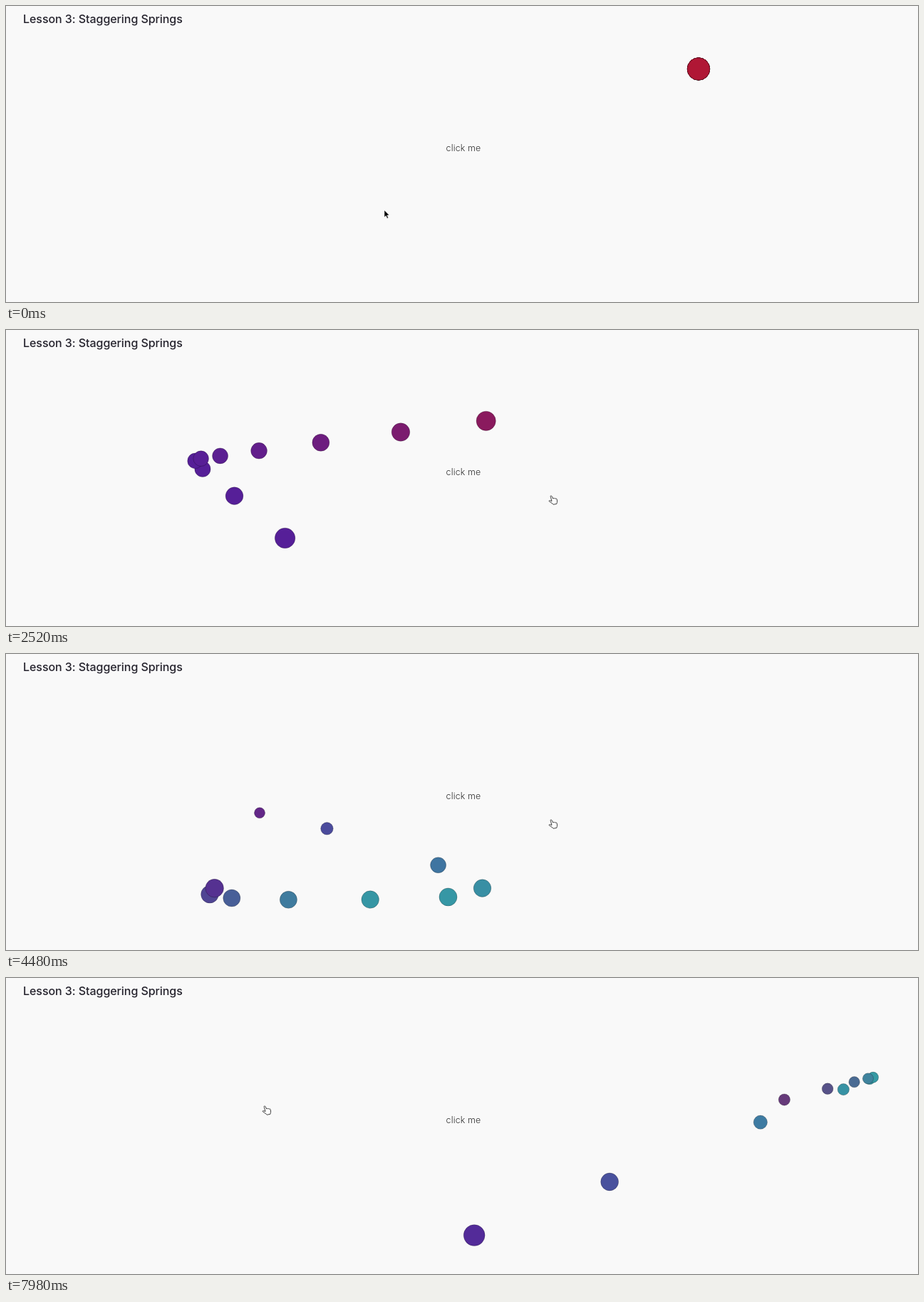
Recreate the animation shown at these times as an HTML page. Size 1280 px wide and 416 px high, loop 8000 ms.

```html
<!DOCTYPE html>
<html lang="en">
<head>
<meta charset="utf-8">
<title>Staggering Springs</title>
<style>
  html, body { margin: 0; width: 100%; height: 100%; overflow: hidden; background: #f9f9f9; }
  svg { display: block; width: 100%; height: 100%; }
  text { font-family: Inter, "Open Sans", sans-serif; }
  .title { font-size: 16px; font-weight: 500; fill: #25232d; letter-spacing: -.06px; }
  .hint { font-size: 12.5px; font-weight: 300; fill: #333; letter-spacing: .1px; text-anchor: middle; }
  .ball { stroke: #000; stroke-opacity: .3; stroke-width: .8; }
</style>
</head>
<body>
<svg viewBox="0 0 1280 416" preserveAspectRatio="none">
  <text class="title" x="24" y="23.5">Lesson 3: Staggering Springs</text>
  <text class="hint" x="642" y="204">click me</text>
  <g id="balls"></g>
  <path id="arrow" d="M0 0V9.8L2.3 7.7 3.9 11.4 5.5 10.7 3.9 7.1H6.9Z" fill="#000" stroke="#fff" stroke-width=".5"/>
  <g id="hand" fill="#fff" stroke="#222" stroke-width=".9" stroke-linejoin="round">
    <path transform="translate(-.8 .3) scale(.95)" d="M1.2 1.2C.4-.4 2.2-1 3 .4L4.8 4C5 3 6.4 3 6.8 4 7.2 3.1 8.4 3.2 8.8 4.2 9.4 3.6 10.4 4 10.6 5L11 8.2C11 9.4 10.4 10 10.2 11.6L5.2 12.6C4.4 11 2 10-.6 8.2-1.6 7.2-.6 6.2.6 6.8L3 7.6Z"/>
  </g>
</svg>
<script>
const LOOP = 8000, STEP = 70, RATE = 60, COUNT = 10;
const STIFFNESS = 170, DAMPING = 26;
const RED = [176, 23, 53], PURPLE = [86, 31, 152], TEAL = [53, 155, 165], PLUM = [97, 32, 128];

// Each click: time, x, y, radius, colour of the new goal
const goals = [
  [0, 972, 88.5, 16, RED],
  [1108, 259.5, 182.3, 11, PURPLE],
  [2305, 427, 322, 15.5, PURPLE],
  [2993, 129, 352, 11, TEAL],
  [3552, 779, 343, 13.5, TEAL],
  [4154, 271, 190, 6.5, PURPLE],
  [4436, 532.5, 313, 11, RED],
  [6138, 1222, 138.2, 7.8, TEAL],
  [7674, 598, 385, 16, PURPLE]
].map(([at, x, y, r, rgb]) => ({ at, body: [x, y, r], rgb }));

// Cursor stops: time, x, y of the tip
const stops = [
  [0, 531, 287], [30, 531, 287], [280, 453, 198], [1500, 453, 198],
  [2200, 764, 233], [6350, 764, 233], [7150, 362, 180], [LOOP, 362, 180]
];

// Unit step response of the chain: every ball springs toward the one before it
const response = (() => {
  const pos = Array(COUNT).fill(0), vel = Array(COUNT).fill(0), rows = [pos.slice()];
  for (let n = 0; n < LOOP / 1000 * RATE; n++) {
    const last = pos.slice();
    for (let i = 0; i < COUNT; i++) {
      const goal = i ? last[i - 1] : 1;
      vel[i] += (STIFFNESS * (goal - pos[i]) - DAMPING * vel[i]) / RATE;
      pos[i] += vel[i] / RATE;
    }
    rows.push(pos.slice());
  }
  return rows;
})();

function progress(i, ms) {
  if (ms <= 0) return 0;
  const f = Math.min(ms * RATE / 1000, response.length - 1.001), n = Math.floor(f);
  return response[n][i] + (response[n + 1][i] - response[n][i]) * (f - n);
}

// Teal fades to plum down the tail
function shade(rgb, i) {
  if (rgb !== TEAL) return rgb;
  const fade = Math.max(0, i - 5) * .18;
  return TEAL.map((c, j) => c + (PLUM[j] - c) * fade);
}

function ballState(i, t) {
  const values = goals.map(g => [...g.body, ...shade(g.rgb, i)]);
  const out = values[0].slice();
  for (let k = 1; k < goals.length; k++) {
    const p = progress(i, t - goals[k].at);
    values[k].forEach((v, j) => { out[j] += (v - values[k - 1][j]) * p; });
  }
  return out;
}

function cursorAt(t) {
  let k = 1;
  while (t > stops[k][0]) k++;
  const [t0, x0, y0] = stops[k - 1], [t1, x1, y1] = stops[k];
  const u = (t - t0) / (t1 - t0), e = u * u * (3 - 2 * u);
  return [x0 + (x1 - x0) * e, y0 + (y1 - y0) * e];
}

const group = document.getElementById("balls");
const arrow = document.getElementById("arrow"), hand = document.getElementById("hand");
const balls = Array.from({ length: COUNT }, () => {
  const c = document.createElementNS("http://www.w3.org/2000/svg", "circle");
  c.setAttribute("class", "ball");
  return group.appendChild(c);
});

function draw(t) {
  balls.forEach((ball, i) => {
    const [x, y, r, ...rgb] = ballState(i, t);
    ball.setAttribute("cx", x.toFixed(2));
    ball.setAttribute("cy", y.toFixed(2));
    ball.setAttribute("r", (r - .3).toFixed(2));
    ball.setAttribute("fill", `rgb(${rgb.map(Math.round)})`);
  });
  const [x, y] = cursorAt(t), isArrow = t < 140;
  arrow.style.display = isArrow ? "" : "none";
  hand.style.display = isArrow ? "none" : "";
  (isArrow ? arrow : hand).setAttribute("transform", `translate(${x.toFixed(1)} ${y.toFixed(1)})`);
}

const start = performance.now();
function tick() {
  const t = (performance.now() - start) % LOOP;
  draw(Math.floor(t / STEP) * STEP);
  requestAnimationFrame(tick);
}
draw(0);
requestAnimationFrame(tick);
</script>
</body>
</html>
```
